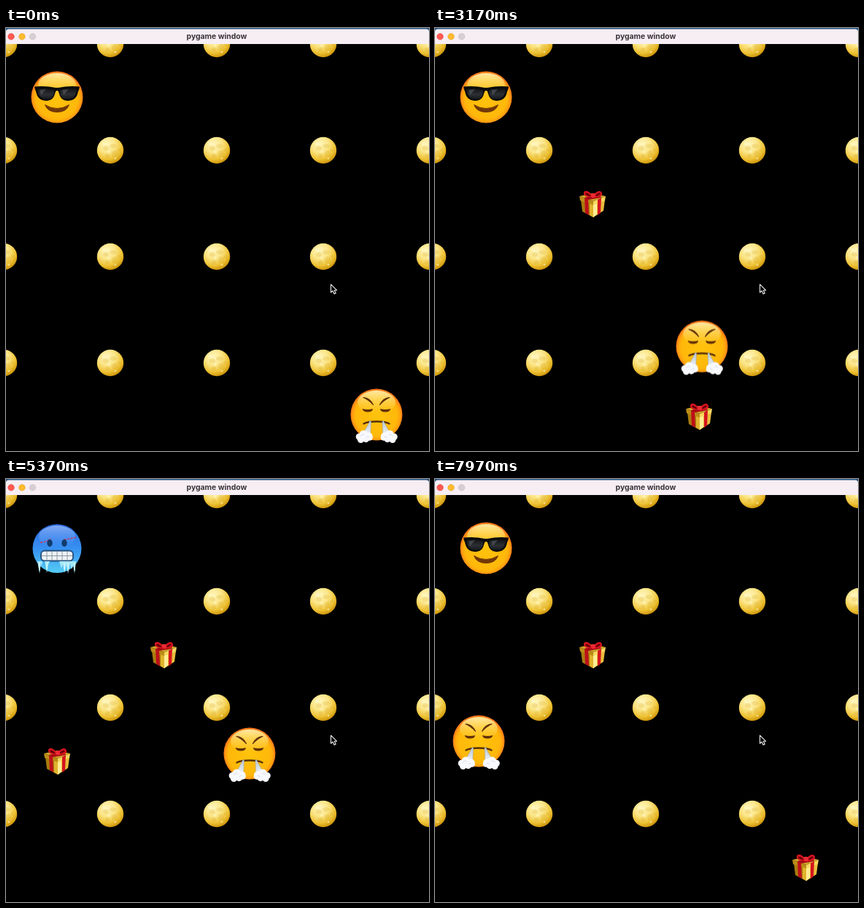
Write an HTML page that moves like this. It is 580 px wide and 581 px high and loops after 8 s.

```html
<!DOCTYPE html>
<html lang="en">
<head>
<meta charset="utf-8">
<title>pygame window</title>
<style>
html, body { margin: 0; width: 100%; height: 100%; overflow: hidden; background: #000; }
svg { display: block; width: 100vw; height: 100vh; }
.title { font: 700 10.4px Inter, Roboto, sans-serif; fill: #3b363a; text-anchor: middle; }

#enemy { animation: chase 8s linear infinite; }
#cool, #frozen, .gift { animation: 8s step-end infinite; }
#cool { animation-name: cool; }
#frozen { animation-name: frozen; }
#gift1 { animation-name: gift1; }
#gift2 { animation-name: gift2; }
#gift3 { animation-name: gift3; }
#gift4 { animation-name: gift4; }

@keyframes chase {
  0%, 5.6% { transform: translate(508px, 531px); }
  14.125% { transform: translate(432px, 531px); }
  20.9% { transform: translate(379px, 531px); }
  22.1% { transform: translate(369px, 531px); }
  29.125% { transform: translate(369px, 468px); }
  36% { transform: translate(369px, 407px); }
  36.3% { transform: translate(366px, 407px); }
  47.85% { transform: translate(366px, 512px); }
  50% { transform: translate(366px, 493px); }
  63.1% { transform: translate(366px, 377px); }
  63.5% { transform: translate(366px, 377px); }
  67.125% { transform: translate(334px, 377px); }
  89.625% { transform: translate(134px, 377px); }
  97.8% { transform: translate(60px, 377px); }
  99.625%, 100% { transform: translate(60px, 360px); }
}
@keyframes cool { 0% { opacity: 1; } 47.85% { opacity: 0; } 85.4%, 100% { opacity: 1; } }
@keyframes frozen { 0% { opacity: 0; } 47.85% { opacity: 1; } 85.4%, 100% { opacity: 0; } }
@keyframes gift1 { 0% { opacity: 0; } 30.5%, 100% { opacity: 1; } }
@keyframes gift2 { 0% { opacity: 0; } 36% { opacity: 1; } 47.85%, 100% { opacity: 0; } }
@keyframes gift3 { 0% { opacity: 0; } 63.4% { opacity: 1; } 97.8%, 100% { opacity: 0; } }
@keyframes gift4 { 0% { opacity: 0; } 97.8%, 100% { opacity: 1; } }
</style>
</head>
<body>
<svg viewBox="0 0 580 581" preserveAspectRatio="none">
  <defs>
    <radialGradient id="skin" cx=".5" cy=".52" r=".5">
      <stop offset="0" stop-color="#ffc30c"/>
      <stop offset=".8" stop-color="#ffb80a"/>
      <stop offset=".92" stop-color="#ffa010"/>
      <stop offset="1" stop-color="#f9781a"/>
    </radialGradient>
    <linearGradient id="shine" x2="0" y2="1">
      <stop offset="0" stop-color="#fff3b4" stop-opacity=".9"/>
      <stop offset="1" stop-color="#ffd95a" stop-opacity="0"/>
    </linearGradient>
    <linearGradient id="ice" x2="0" y2="1">
      <stop offset="0" stop-color="#2c67dc"/>
      <stop offset=".5" stop-color="#3791f2"/>
      <stop offset="1" stop-color="#55cdf5"/>
    </linearGradient>
    <linearGradient id="iceShine" x2="0" y2="1">
      <stop offset="0" stop-color="#a9c9ff" stop-opacity=".7"/>
      <stop offset="1" stop-color="#6eabff" stop-opacity="0"/>
    </linearGradient>
    <linearGradient id="lens" x2="0" y2="1">
      <stop offset="0" stop-color="#111214"/>
      <stop offset=".55" stop-color="#2c2f33"/>
      <stop offset="1" stop-color="#15161a"/>
    </linearGradient>
    <radialGradient id="gold" cx=".38" cy=".28" r=".78">
      <stop offset="0" stop-color="#fff6bd"/>
      <stop offset=".4" stop-color="#fbe587"/>
      <stop offset=".72" stop-color="#eec235"/>
      <stop offset="1" stop-color="#c68a00"/>
    </radialGradient>
    <linearGradient id="steam" x2="0" y2="1">
      <stop offset="0" stop-color="#b9c5cf"/>
      <stop offset="1" stop-color="#f5f8fc"/>
    </linearGradient>

    <g id="coin">
      <circle r="18.2" fill="url(#gold)"/>
      <g fill="#d7aa2a" opacity=".23">
        <ellipse cx="-6" cy="-3" rx="4" ry="3"/>
        <ellipse cx="4" cy="-6" rx="5" ry="3"/>
        <ellipse cx="6" cy="5" rx="4" ry="5"/>
        <circle cx="-4" cy="8" r="3"/>
        <circle cx="12" cy="0" r="2.5"/>
      </g>
      <g fill="#fffbd0" opacity=".5">
        <circle cx="-2" cy="2" r="2"/>
        <circle cx="7" cy="11" r="1.5"/>
        <circle cx="-9" cy="-9" r="2.5"/>
      </g>
    </g>

    <g id="face">
      <circle r="35.5" fill="url(#skin)"/>
      <ellipse cy="-17" rx="26" ry="16" fill="url(#shine)"/>
    </g>

    <g id="present">
      <path d="M-16-5L1 0V19L-14 11Z" fill="#a87b0d"/>
      <path d="M1 0L17-5 15 10 1 19Z" fill="#e9bd3c"/>
      <path d="M-4-1L1 0V19L-4 16Z" fill="#e0b32d"/>
      <path d="M1 0L6-1V15L1 19Z" fill="#ffed93"/>
      <path d="M-18-10L0-14 18-10 1-3Z" fill="#d2a32b"/>
      <path d="M-18-10L1-3V2L-17-4Z" fill="#bb8c17"/>
      <path d="M1-3L18-10 17-4 1 2Z" fill="#f6d75d"/>
      <path d="M-11-8L-6-6-5 16-10 13Z" fill="#bd1019"/>
      <path d="M7-5L12-8 11 13 7 16Z" fill="#d5141e"/>
      <path d="M-11-8L8-13 12-8-6-5Z" fill="#a90a14"/>
      <path d="M0-10C-4-18-11-19-12-15-13-10-7-8 0-9 7-7 14-9 13-14 12-19 5-18 0-10Z" fill="#d7141f"/>
      <path d="M-2-10Q-7-16-10-14-9-10-2-10ZM3-10Q8-16 11-14 9-10 3-10Z" fill="#650009"/>
      <ellipse cx="1" cy="-11" rx="3" ry="3.3" fill="#ee2934"/>
    </g>

    <g id="puff">
      <path d="M7.5-20Q9-20 9-18L8 1-5 1Q1-6 7.5-20Z" fill="url(#steam)" stroke="#8ca2b4" stroke-width=".5"/>
      <g fill="#f7f9fd">
        <circle cx="-7" cy="2" r="4.8"/><circle cx="-1" cy="-1" r="6"/><circle cx="6" cy="1" r="5"/>
        <circle cx="-5" cy="6" r="4.5"/><circle cx="2" cy="5" r="4.7"/><circle cx="7" cy="3" r="4.3"/>
      </g>
      <path d="M-5 1Q-3-3 0 0M2 4Q5 0 6 3" fill="none" stroke="#cdd5e1" stroke-width=".8"/>
    </g>

    <g id="angryHalf">
      <path d="M-18-23.5Q-9-23-4.5-13.5-11-20.5-18-23.5Z" fill="#603008" stroke="#603008" stroke-width="1.2" stroke-linejoin="round"/>
      <path d="M-19.5-8Q-12-6.2-5-8-5.5-3.5-12-3.5-18-3.5-19.5-8Z" fill="#623008"/>
    </g>
  </defs>

  <rect width="580" height="581"/>
  <g id="coins"></g>

  <g transform="translate(70 95)">
    <g id="cool">
      <use href="#face"/>
      <path d="M-31-14.5Q-16-16-2-13H2Q16-16 31-14.5L30-10Q29-9 28.5-6 26 5 14 5 5 5 2.5-6 2-9 0-9-2-9-2.5-6-5 5-14 5-26 5-28.5-6-29-9-30-10Z" fill="#090a0c"/>
      <path id="glass" d="M-27-11Q-15-13-4-10-4 3-14 3-25 3-27-11Z" fill="url(#lens)"/>
      <use href="#glass" transform="scale(-1 1)"/>
      <path d="M-24-10L-15-11-22-3ZM7-10L16-11 9-3Z" fill="#777c83" opacity=".4"/>
      <path d="M-16.5 10.5Q0 20.5 16.5 10.5 13 20.5 0 20.5-13 20.5-16.5 10.5Z" fill="#723807" stroke="#723807" stroke-linejoin="round"/>
    </g>
    <g id="frozen">
      <circle cy=".5" r="33.5" fill="url(#ice)"/>
      <ellipse cy="-16" rx="25" ry="15" fill="url(#iceShine)"/>
      <path d="M-23-8Q-14-8-9-13M10-12Q15-12 26-15" fill="none" stroke="#b34478" stroke-width="1.8" stroke-dasharray="3 1.5"/>
      <ellipse cx="-10" cy="-7" rx="3.7" ry="5" fill="#123b6d"/>
      <ellipse cx="10" cy="-7" rx="3.7" ry="5" fill="#123b6d"/>
      <rect x="-22" y="3.5" width="44" height="14" rx="5" fill="#eef2f5" stroke="#234f7d" stroke-width="1.8"/>
      <path d="M-21 10.5H21M-14 4V17M-7 4V17M0 4V17M7 4V17M14 4V17" stroke="#84909d" stroke-width=".9"/>
      <path d="M-27 18H-20L-21 26-22 20-24 35ZM-17 18H-10L-12 23-14 34-16 23ZM3 18H26L24 35 22 23 20 29 18 21 15 35 13 23 10 34 8 22 6 28Z" fill="#a7e8f7"/>
      <path d="M-24 20V31M-14 20V29M10 20V30M15 20V31M24 20V31" stroke="#e6ffff" stroke-width="1"/>
    </g>
  </g>

  <use id="gift1" class="gift" href="#present" x="216" y="241"/>
  <use id="gift2" class="gift" href="#present" x="362" y="533"/>
  <use id="gift3" class="gift" href="#present" x="70" y="387"/>
  <use id="gift4" class="gift" href="#present" x="508" y="533"/>

  <g id="enemy">
    <use href="#face"/>
    <use href="#angryHalf"/>
    <use href="#angryHalf" transform="scale(-1 1)"/>
    <path d="M-17.5 12.5Q-12 9.5 0 9.5 12 9.5 17.5 12.5" fill="none" stroke="#573009" stroke-width="2.5" stroke-linecap="round"/>
    <use href="#puff" x="-16.5" y="28.5"/>
    <use href="#puff" transform="translate(17 28.5) scale(-1 1)"/>
  </g>

  <rect width="580" height="6" fill="#245583"/>
  <path d="M0 22V5Q0 1.5 4 1.5H576Q580 1.5 580 5V22Z" fill="#f7eef4"/>
  <g stroke-width=".6">
    <circle cx="7" cy="11.8" r="4.3" fill="#ff5951" stroke="#df453e"/>
    <circle cx="22" cy="11.8" r="4.3" fill="#febb2d" stroke="#dda022"/>
    <circle cx="36.5" cy="11.8" r="4.3" fill="#d7ced2" stroke="#c3babf"/>
  </g>
  <text class="title" x="289" y="15.2">pygame window</text>
  <path d="M445.5 352.2V363.3L448 361 450 365.3 452.2 364.2 450.2 360.2H453.5Z" fill="#000" stroke="#eee" stroke-width="1.1" stroke-linejoin="round"/>
</svg>
<script>
const spacing = 146;
let coins = "";
for (let row = 0; row < 4; row++)
  for (let col = 0; col < 5; col++)
    coins += `<use href="#coin" x="${col * spacing - 3}" y="${row * spacing + 22}"/>`;
document.getElementById("coins").innerHTML = coins;
</script>
</body>
</html>
```
